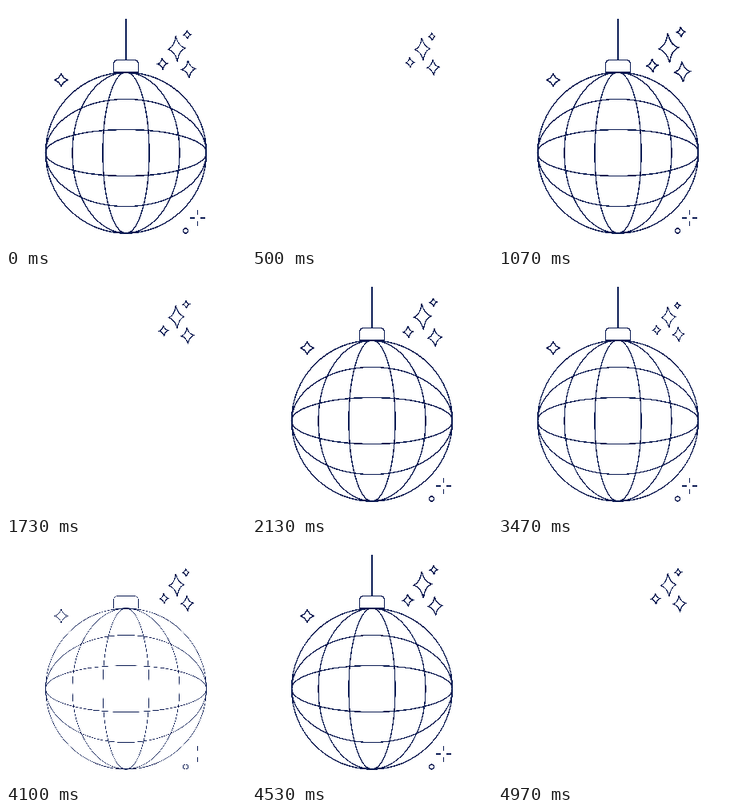
Animation, 300 px wide and 300 px high, one loop 5010 ms. Source, as an HTML page:

```html
<!DOCTYPE html>
<html lang="en">
<head>
<meta charset="utf-8">
<title>Disco ball</title>
<style>
  html, body { margin: 0; width: 100%; height: 100%; overflow: hidden; background: #fff; }
  svg { display: block; width: 100vw; height: 100vh; }
  .ink { fill: none; stroke: #0b1c54; stroke-width: 1.5; }
  #sparkles { stroke-width: 1.3; }
</style>
</head>
<body>
<svg viewBox="0 0 300 300">
  <defs>
    <!-- Hard ink edge: faint coverage drops out, the rest turns solid -->
    <filter id="crisp" filterUnits="userSpaceOnUse" x="0" y="0" width="300" height="300"
            color-interpolation-filters="sRGB">
      <feComponentTransfer><feFuncA type="linear" slope="20" intercept="-9.5"/></feComponentTransfer>
    </filter>
  </defs>
  <g class="ink" filter="url(#crisp)">
    <g id="ball">
      <path d="M150 16V68"/>
      <path d="M134.5 83V73Q134.5 67.5 140 67.5H160Q165.5 67.5 165.5 73V83Z"/>
      <circle cx="150" cy="183.5" r="100.5"/>
      <ellipse cx="150" cy="183.5" rx="29" ry="100.5"/>
      <ellipse cx="150" cy="183.5" rx="67" ry="100.5"/>
      <ellipse cx="150" cy="183.5" rx="100.5" ry="29"/>
      <ellipse cx="150" cy="183.5" rx="100.5" ry="67"/>
      <path d="M239.5 255V261M239.5 269V275M230 265H236M243 265H249.5"/>
      <circle cx="224.5" cy="281" r="3"/>
    </g>
  </g>
  <g class="ink" filter="url(#crisp)">
    <g id="sparkles"></g>
  </g>
</svg>
<script>
  const LOOP = 5010, FPS = 30, FRAMES = 150;
  const ball = document.getElementById('ball');
  const sparkles = document.getElementById('sparkles');

  // Four-pointed star with concave sides
  function addStar(parent, x, y, w, h, tilt = 0) {
    const path = document.createElementNS('http://www.w3.org/2000/svg', 'path');
    const a = w * 0.2, b = h * 0.2;
    path.setAttribute('d', `M0 ${-h}Q${a} ${-b} ${w} 0Q${a} ${b} 0 ${h}Q${-a} ${b} ${-w} 0Q${-a} ${-b} 0 ${-h}Z`);
    path.setAttribute('transform', `translate(${x} ${y}) rotate(${tilt})`);
    parent.append(path);
  }

  const TILT = -4;
  addStar(ball, 69, 92.5, 8.8, 8.8);
  addStar(sparkles, 213.2, 53.5, 10.5, 16, TILT);
  addStar(sparkles, 226.5, 36, 4.5, 5.5, TILT);
  addStar(sparkles, 195.7, 72.2, 6, 7.5, TILT);
  addStar(sparkles, 228.2, 79, 8.5, 11.2, TILT);

  // Ball fades in and out every 32 frames
  function ballOpacity(frame) {
    const wave = (1 + Math.cos((frame - 3.3) / 32 * 2 * Math.PI)) / 2;
    return 0.12 + 0.88 * wave;
  }

  // Sparkles shrink for 15 frames, then swell for 12
  function sparkleScale(frame) {
    const small = 0.8, large = 1.16, shrink = 15, period = 27;
    const p = (frame + period - 5.5) % period;
    const k = p < shrink
      ? Math.pow(1 - p / shrink, 1.35)
      : (1 - Math.cos((p - shrink) / (period - shrink) * Math.PI)) / 2;
    return small + (large - small) * k;
  }

  function draw(time) {
    const frame = Math.min(FRAMES - 1, Math.floor((time % LOOP + 4) * FPS / 1000));
    ball.setAttribute('opacity', ballOpacity(frame).toFixed(3));
    sparkles.setAttribute('transform',
      `translate(212.5 58) scale(${sparkleScale(frame).toFixed(4)}) translate(-212.5 -58)`);
  }

  const start = performance.now();
  function tick() {
    draw(performance.now() - start);
    requestAnimationFrame(tick);
  }
  tick();
</script>
</body>
</html>
```
